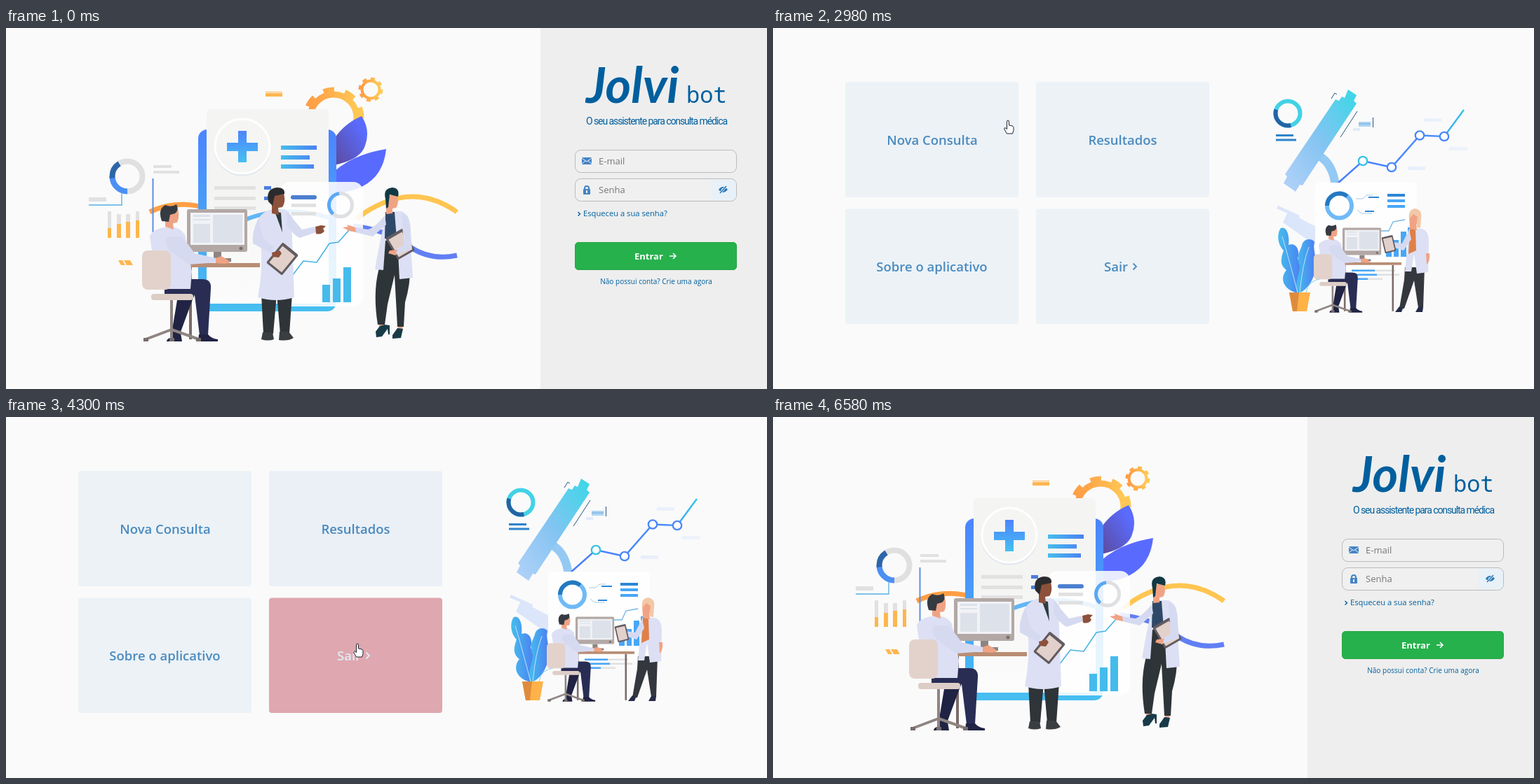
An HTML page for the animation above (7.71 s loop, 1085x516 px).

```html
<!DOCTYPE html>
<html lang="pt">
<head>
<meta charset="utf-8">
<style>
html,body{margin:0;width:100%;height:100%;overflow:hidden;background:#fafafa}
svg{display:block;width:1085px;height:516px;font-family:"Open Sans","Noto Sans",sans-serif}
.ln{fill:none}
.coat{fill:#dde0f4}
.sleeve{fill:#d6daf1}
.skin{fill:#f0a384}
.gray{fill:#e1e1e1}
.menu text{font-size:18.5px;font-weight:600;fill:#4b8bc0}
.card{fill:#ecf2f6}
.mark{fill:#005f9e}
</style>
</head>
<body>
<svg viewBox="0 0 1085 516">
<defs>
  <linearGradient id="tablet" x2="0" y2="1"><stop stop-color="#4c84ff"/><stop offset="1" stop-color="#46bff0"/></linearGradient>
  <linearGradient id="sky"><stop stop-color="#46bdec"/><stop offset="1" stop-color="#4b80f2"/></linearGradient>
  <linearGradient id="sun"><stop stop-color="#ff9c45"/><stop offset="1" stop-color="#ffc955"/></linearGradient>
  <linearGradient id="leaf" y1="1" y2="0"><stop stop-color="#5c4a9c"/><stop offset=".8" stop-color="#5a6cff"/></linearGradient>
  <linearGradient id="scope" x1="1" x2="0" y2="1"><stop stop-color="#38d8e6"/><stop offset=".5" stop-color="#84c4f2"/><stop offset="1" stop-color="#b4d2f8"/></linearGradient>
  <linearGradient id="trend" gradientUnits="userSpaceOnUse" x1="804" x2="985"><stop stop-color="#4a7dfa"/><stop offset=".75" stop-color="#4a8cff"/><stop offset="1" stop-color="#35c8e8"/></linearGradient>
  <linearGradient id="pale"><stop stop-color="#d9e4fa"/><stop offset="1" stop-color="#eef3fc"/></linearGradient>
  <linearGradient id="paper" x2="0" y2="1"><stop offset=".4" stop-color="#f4f4f3"/><stop offset="1" stop-color="#fcfcfc"/></linearGradient>

  <g id="worker">
    <path fill="#7a6b69" d="M261 342h4v103h-4zM368 342h4v103h-4z"/>
    <path fill="#b98d74" d="M251 336h138v6H251z"/>
    <path fill="#8d8583" d="M296 320h11v9h14v5h-41v-3l16-3z"/>
    <rect x="258" y="259" width="86" height="61" rx="3" fill="#b3a8a5"/>
    <path fill="#f1f3f7" d="M263 264h77v46h-77z"/>
    <path fill="#dde2ea" d="M267 267h24v3h-24zM267 273h24v2h-24zM267 280h24v27h-24zM295 267h42v40h-42z"/>
    <circle cx="335" cy="315" r="2.5" fill="#7a706e"/>
    <path fill="#202343" d="M246 366h24q2 10-4 22l-18 49h-12l8-48z"/>
    <path fill="#292d54" d="M226 359h54q13 0 12 13l-4 67h-12l-7-57-43 1z"/>
    <path fill="#202343" d="M236 436h13l2 12h-22q0-4 7-6zM275 438h13q5 6 14 7v3h-28z"/>
    <path class="coat" d="M226 285q-18 3-21 13l4 27 17 48h37l2-25-10-53q-11-14-29-10z"/>
    <path class="sleeve" d="M232 298q-10 5 2 21l27 19 41-3-2-6-31-7-18-24z"/>
    <path class="skin" d="M227 284v-11l18-15q3 12-1 20l-6 1 1 9zM299 329l8-3q8 4 13 9l-8 2-13-1z"/>
    <path fill="#363b42" d="M222 276q-6-17 5-23 9 4 16-1 4 8-2 13l-7 2-2 10z"/>
    <rect x="194" y="318" width="41" height="56" rx="8" fill="#e3d2cb"/>
    <rect x="207" y="380" width="60" height="9" rx="4" fill="#dccdc6"/>
    <path class="ln" stroke="#8f8582" stroke-width="4" d="M236 389v43M236 431l-37 14M236 431l39 14M236 431v15"/>
    <path fill="#766d6c" d="M196 443h7v5h-7zM233 443h7v5h-7zM271 443h7v5h-7z"/>
  </g>
  <g id="board"><rect x="-14" y="-18" width="28" height="36" rx="2" fill="#635b60"/><path fill="#e2d1cb" d="M-11-14h22v29h-22z"/></g>
</defs>

<g id="login">
  <path fill="#eee" d="M762 0h323v516H762z"/>
  <!-- gears and tablet -->
  <g class="ln" stroke="url(#sun)">
    <circle cx="467" cy="128" r="33" stroke-width="9"/><circle cx="467" cy="128" r="39" stroke-width="9" pathLength="16" stroke-dasharray="1" stroke-dashoffset="-1.06"/>
    <circle cx="520" cy="88" r="12.5" stroke-width="4"/><circle cx="520" cy="88" r="15.5" stroke-width="4" pathLength="16" stroke-dasharray="1"/>
    <path stroke="#ff9f45" stroke-width="7" d="M205 263q36-18 80-6"/>
  </g>
  <path fill="#ffb650" d="M370 91h24v1h-24zM370 93h24v5h-24zM160 332h6l4 7h-6zM168 332h9l4 7h-9z"/>
  <path fill="url(#leaf)" d="M468 196V158q15-22 39-32 13 20 5 42-6 20-44 28z"/>
  <path fill="#596bff" d="M468 236v-31q26-24 74-32-6 59-74 63z"/>
  <rect x="274" y="145" width="197" height="260" rx="13" fill="url(#tablet)"/>
  <rect x="286" y="116" width="174" height="278" rx="5" fill="url(#paper)"/>
  <circle cx="337" cy="171" r="39" class="ln" stroke="#e0e7ee" stroke-width="3"/>
  <circle cx="337" cy="169" r="39" fill="#f5f5f4" stroke="#fff" stroke-width="3"/>
  <path fill="url(#tablet)" d="M331 147h12v17h16v12h-16v16h-12v-16h-16v-12h16z"/>
  <path fill="url(#sky)" d="M392 168h51v6h-51zM392 182h41v6h-41zM392 195h47v6h-47z"/>
  <path class="gray" d="M297 226h59v5h-59zM297 241h59v5h-59zM297 255h59v5h-59z"/>
  <path fill="#4b7edc" d="M368 226h10v5h-10zM368 241h10v5h-10z"/>
  <path class="ln" stroke="#62b6f5" stroke-width="6" d="M318 285q68-38 145-13"/>
  <path class="ln" stroke="#ffc552" stroke-width="7" d="M500 273q16-14 38-23 54-23 105 13"/>
  <path class="ln" stroke="#617ff4" stroke-width="7" d="M495 283q50 6 81 30 30 20 67 12"/>
  <rect x="391" y="220" width="118" height="178" rx="14" fill="#fff" opacity=".87"/>
  <rect x="406" y="239" width="37" height="6" rx="3" fill="#4c7fd0"/>
  <path class="gray" d="M407 251h35v5h-35zM407 263h35v5h-35z"/>
  <g class="ln" stroke-width="5">
    <circle cx="477" cy="253" r="16.5" stroke="#dfe0e2"/>
    <circle cx="477" cy="253" r="16.5" stroke="#5aa8f4" pathLength="100" stroke-dasharray="37 63" stroke-dashoffset="-36"/>
  </g>
  <path class="ln" stroke="#48b2e4" stroke-width="1.6" d="M405 358l19-25 19 2 18-27 13-2 15-17"/>
  <path fill="#45bbec" d="M451 367h11v25h-11zM466 358h11v34h-11zM481 342h11v50h-11z"/>
  <!-- left charts -->
  <g class="ln" stroke-width="8">
    <circle cx="173" cy="212" r="21.5" stroke="#e0e0e0"/>
    <circle cx="173" cy="212" r="21.5" stroke="#4c8ff4" pathLength="100" stroke-dasharray="24 76" stroke-dashoffset="-25"/>
    <circle cx="173" cy="212" r="21.5" stroke="#2c66a8" pathLength="100" stroke-dasharray="18 82" stroke-dashoffset="-48"/>
  </g>
  <path class="gray" d="M210 196h26v4h-26zM210 204h37v4h-37zM118 242h25v6h-25zM145 262h5v24h-5zM158 266h6v15h-6zM171 266h6v12h-6zM185 262h5v13h-5z"/>
  <path fill="#ffb64c" d="M145 286h5v14h-5zM158 280h6v20h-6zM171 277h6v23h-6zM185 275h5v25h-5z"/>
  <path class="ln" stroke="#54b0e2" stroke-width="1.3" d="M118 253h47v-18"/>
  <path class="ln" stroke="#5b8ee6" stroke-width="2" d="M209.5 215v77"/>
  <svg width="362" height="516"><use href="#worker"/></svg>
  <!-- standing man -->
  <path fill="#2e3437" d="M364 380h22l-5 57h-14zM386 380h22l-4 57h-13z"/>
  <path fill="#3a3e41" d="M366 435h14l2 10q-9 3-18 0zM390 434h13l7 9q-8 5-21 3z"/>
  <path class="coat" d="M376 260l20-1q10 3 11 15l4 111q-26 8-52 0 8-42 4-82l-11-3q4-35 24-40z"/>
  <path fill="#2d3b3f" d="M383 262l9 2 2 28z"/>
  <path class="sleeve" d="M400 263q6 2 10 11l12 14 18-4 2 8-23 8q-8-3-19-18zM360 272q-10 20-8 36l26 14 4-9-15-12z"/>
  <path fill="#8c513b" d="M379 265v-24l16-8q5 14-1 23l-6 1 1 10zM441 284l8-2 7 1-4 4 2 3q-4 6-12 4z"/>
  <path fill="#2b2b2d" d="M374 248q-4-18 12-20 12 0 11 9l-14 3-3 14z"/>
  <use href="#board" transform="translate(394 330) rotate(39) scale(1.04)"/>
  <path fill="#8c513b" d="M379 321l11-3 3 4-4 6-9-1z"/>
  <!-- standing woman -->
  <path class="skin" d="M532 418h7l-1 12h-6zM559 420h7l-1 12-6-2z"/>
  <path fill="#2e3538" d="M541 298h24l11 42q1 25-7 52l-2 35h-9l-4-74-10 42-4 29h-10q-7-44 1-77z"/>
  <path fill="#183b48" d="M527 434l6-8 7-2 7 1v13h-2l-1-8-8 11-8 1zM551 439l7-10 8 1-3 13-12 1z"/>
  <path class="coat" d="M542 262h22q10 4 11 15l5 80-19 2-3-58-17 3-3 42-12-1q5-30 10-52z"/>
  <path fill="#304867" d="M541 263h13l3 38h-17z"/>
  <path class="sleeve" d="M540 268q-15 18-24 20l-18-3v7l25 6 19-17z"/>
  <path class="skin" d="M498 285l-12-4 2 3-8 1 9 5 10 2zM542 266v-25l14-5q6 13 0 21l-5 1v7z"/>
  <path fill="#123943" d="M541 244q-4-15 10-16 11 1 8 13l-12-3-2 18-3 2z"/>
  <use href="#board" transform="translate(562 309) rotate(-30)"/>
  <path class="sleeve" d="M564 266q13 0 13 26l2 24-24 8 0-7 12-7z"/>
  <path class="skin" d="M558 317l-11 1-2 4 10 3z"/>
  <!-- form -->
  <g class="mark">
    <text x="827" y="107" font-family="Lato,sans-serif" font-size="70" font-weight="700" font-style="italic">Jolvi</text>
    <text x="970" y="107" font-family="Noto Sans Mono,monospace" font-size="32" font-weight="500">bot</text>
    <text x="827" y="138" font-family="Roboto,sans-serif" font-size="14" letter-spacing="-1.08">O seu assistente para consulta médica</text>
    <text x="823" y="269" font-size="11.2">Esqueceu a sua senha?</text>
    <text id="signup" x="927" y="366" font-size="10.05" text-anchor="middle">Não possui conta? Crie uma agora</text>
  </g>
  <g fill="#f0f0f0" stroke="#b9bbbd"><rect x="811.5" y="174.5" width="230" height="32" rx="8"/><rect x="811.5" y="215.5" width="230" height="32" rx="8"/></g>
  <path fill="#e8f0f8" d="M1006 217h28q7 1 7 7v15q0 6-7 7h-28z"/>
  <rect x="821" y="185" width="14" height="10" rx="1" fill="#4484c4"/>
  <path class="ln" stroke="#eef2f6" d="M821 186l7 5 7-5M821 194l5-4M835 194l-5-4"/>
  <rect x="823" y="230" width="10" height="8" rx="1" fill="#4484c4"/>
  <path class="ln" stroke="#4484c4" stroke-width="2" d="M825 231v-2q0-3 3-3t3 3v2"/>
  <path fill="#eee" d="M827 232h2v4h-2z"/>
  <path fill="#2879b9" d="M1016 231q6-8 13 0-7 8-13 0z"/><circle cx="1022" cy="231" r="2" fill="#e8f0f8"/>
  <path class="ln" stroke="#e8f0f8" stroke-width="3" d="M1018 236l9-10"/><path class="ln" stroke="#2879b9" stroke-width="1.4" d="M1018 236l9-10"/>
  <g font-size="13" fill="#777"><text x="845" y="195">E-mail</text><text x="845" y="236">Senha</text></g>
  <path class="ln" stroke="#005f9e" stroke-width="1.4" d="M815.5 263l3 2.700-3 2.700"/>
  <rect id="enter" x="811.5" y="306.5" width="230" height="39" rx="4.5" stroke="#28a745"/>
  <text x="896" y="331" font-size="13" font-weight="700" fill="#fff">Entrar</text>
  <path class="ln" stroke="#fff" stroke-width="1.5" d="M946 326h9M951 322l4 4-4 4"/>
</g>

<g id="home" class="menu">
  <rect class="card" x="103" y="77" width="247" height="165" rx="4"/><text x="227" y="167" text-anchor="middle">Nova Consulta</text>
  <rect class="card" x="375" y="77" width="247" height="165" rx="4"/><text x="498.5" y="167" text-anchor="middle">Resultados</text>
  <rect class="card" x="375" y="258.5" width="247" height="164.5" rx="4"/><text x="472" y="348">Sair</text>
  <rect class="card" x="103" y="258.5" width="247" height="164.5" rx="4"/><text x="226.5" y="348" text-anchor="middle">Sobre o aplicativo</text>
  <path id="chevron" class="ln" stroke-width="1.8" d="M513.5 336.5l4.500 4.500-4.500 4.500"/>
  <!-- microscope and trend -->
  <g class="ln" stroke-width="6">
    <circle cx="734" cy="122" r="17.5" stroke="#42d2e6"/>
    <circle cx="734" cy="122" r="17.5" stroke="#2464a4" pathLength="100" stroke-dasharray="34 66" stroke-dashoffset="-21"/>
  </g>
  <path fill="#2d83cc" d="M717 152h25v3h-25zM717 158.500h29v3h-29z"/>
  <path class="ln" stroke="#94c9f4" stroke-width="12" d="M779 183q20 12 23 44"/>
  <path fill="url(#scope)" d="M820 88l12 8-4 8 4 4-77 117-4-1-6 10-17-12 5-10-3-3 72-107 5 2 4-6 4 2z"/>
  <path class="ln" stroke="#28527e" d="M796 101l5-8 3 2M809 156l24-37M855.500 128v14"/>
  <path fill="#aed5f3" d="M835 134h17v7h-17z"/><path class="ln" stroke="#6ca9da" d="M835 137h17"/>
  <path fill="url(#pale)" d="M928 129h25v5h-25zM964 170h26v5h-26zM905 198h25v5h-25zM827 143h10v4h-10zM720 254l31 14-1 4-32-14zM734 263l40 21v27l-47-33z"/>
  <path class="ln" stroke="url(#trend)" stroke-width="2.500" d="M804 223l37-33 41 9 40-45.500 35 1.500 28-38"/>
  <g fill="#fff" stroke="#4a86fa" stroke-width="2.300"><circle cx="841" cy="190" r="6.200" stroke="#38c0e4"/><circle cx="882" cy="199" r="6.200"/><circle cx="922" cy="153.500" r="6.200"/><circle cx="957" cy="155" r="6.200"/></g>
  <rect x="773" y="221" width="145" height="129" rx="6" fill="#fefefe"/>
  <g class="ln" stroke-width="6">
    <circle cx="807.5" cy="254" r="17.5" stroke="#70baf6"/>
    <circle cx="807.5" cy="254" r="17.5" stroke="#2379c2" pathLength="100" stroke-dasharray="36 64" stroke-dashoffset="-50"/>
  </g>
  <path class="ln" stroke="#a6c9e4" d="M831 244h10l5-5h9M833 260l6 5h15"/>
  <path fill="#2d86d6" d="M849 241h15v2h-15zM844 261h13v2h-13zM876 237h25v4h-25z"/>
  <path fill="#48a6f8" d="M876 245h25v4h-25zM876 253h25v4h-25zM874 309h8v18h-8zM885 303h7v24h-7zM895 291h8v36h-8zM905 285h8v42h-8z"/>
  <path class="ln" stroke="#73b4e6" stroke-width="1.300" d="M866 290h12l6-13 17-3"/>
  <path class="gray" d="M825 345.500h62v2.500h-62zM825 351.500h68v2.500h-68zM825 357.500h44v2.500h-44z"/>
  <path fill="#48a6f8" d="M825 345.500h33v2.500h-33zM825 351.500h36v2.500h-36zM825 357.500h23v2.500h-23z"/>
  <!-- plant -->
  <g fill="url(#sky)">
    <path d="M745 378c-17-5-23-20-13-32-11-8-7-19-4-28-10-10-9-26-4-32 9-4 13 13 11 24 11-4 17 8 13 20 8 12 4 32 1 48z"/>
    <path d="M747 378c-3-16 4-26 4-38-6-14 1-22 3-29 2-11 15-11 18-5-3 12 4 19 0 32 4 12-7 34-20 40z"/>
  </g>
  <path class="ln" stroke="#bde4ff" d="M726 298q10 34 22 80M764 313q-9 24-13 65"/>
  <path class="ln" stroke="#7ecdf4" d="M760 378q2-17 23-20"/>
  <path fill="#ffb247" d="M736 378h30l-5 27h-20z"/><path fill="#df8b3e" d="M736 378h14l-3 27h-6z"/>
  <use href="#worker" transform="translate(646.6 119.5) scale(.641)"/>
  <!-- woman with clipboard -->
  <path fill="#34373d" d="M901 342h28l-2 58h-7l-6-39-14 40h-7l7-41z"/>
  <path fill="#252b47" d="M893 398l5 3-2 5h-9zM920 399h7l-1 7h-10z"/>
  <path class="coat" d="M907 287h18q9 2 10 16l-1 46-16 2-4-28-4 25h-9z"/>
  <path fill="#df8049" d="M908 287h8l1 31-11 5z"/>
  <path class="sleeve" d="M907 288l-10 20-13-2-1 7 16 5 11-16z"/>
  <path class="skin" d="M908 287l-1-19 10-5 5 14-5 4 1 8zM877 306l7 0-1 7-8-2zM931 322h5q1 12-4 16z"/>
  <path fill="#f3c8a8" d="M907 273q-2-14 9-15 10 2 8 14l-1 14-6-1 2-15-6-4z"/>
  <use href="#board" transform="translate(878 309) rotate(-13) scale(.58 .65)"/>
</g>

<circle id="click" r="10" fill="#e9c64e"/>
<g id="cursor" stroke="#20222e" fill="#fff" stroke-linejoin="round">
  <path id="arrow" d="M.5.500V14l3.200-3 2.200 4.800 2-.9-2.200-4.700H10z"/>
  <path id="hand" d="M-1.500 2q0-2 1.500-2t1.500 2v5l2.500.4 3 1q1 .6 1 2.600v3.500L6.500 19h-8L-5 13q-1-2.300 1-2.400l2.500 2z"/>
</g>
</svg>
<script>
const LOOP = 7710;
const $ = id => document.getElementById(id);
const cards = document.querySelectorAll('.card'), labels = document.querySelectorAll('.menu text');

// start, end, number of steps, [step, x, y] waypoints
const moves = [
  [110, 810, 11, [[1,577,456],[6,690,275],[9,783,193],[11,802,208]]],
  [940, 1490, 9, [[1,806,210],[5,880,262],[9,952,325]]],
  [2440, 3120, 11, [[0,952,325],[3,800,265],[7,440,150],[9,335,132],[10,315,128],[11,300,140]]],
  [3320, 4090, 12, [[0,300,140],[4,350,170],[8,430,205],[12,478,257]]],
  [4160, 4440, 5, [[1,486,306],[5,515,341]]],
  [5390, 6160, 12, [[0,515,341],[6,780,352],[8,870,362],[10,935,395],[12,965,430]]],
  [6230, 6580, 6, [[0,965,430],[5,1036,505],[6,1046,540]]]
];

function pointer(t) {
  const move = moves.filter(m => t >= m[0]).pop();
  if (!move) return [-50, -50];
  const [start, end, n, pts] = move;
  const step = Math.min(n, 1 + Math.floor((t - start) / (end - start) * (n - 1) + .1));
  const i = Math.max(1, pts.findIndex(p => p[0] >= step));
  const [a, b] = [pts[i - 1], pts[i]], u = (step - a[0]) / (b[0] - a[0]);
  return [a[1] + (b[1] - a[1]) * u, a[2] + (b[2] - a[2]) * u];
}

const show = (id, on) => $(id).style.display = on ? '' : 'none';
const mix = (from, to, u) => `color-mix(in srgb, ${to} ${u * 100}%, ${from})`;
// stepped hover fade
function rise(t, start) {
  const k = Math.floor((t - start) / 70) + 1;
  return k < 1 ? 0 : Math.min(1, .2 + .21 * k);
}
function paintCard(i, u, fill, ink) {
  cards[i].style.fill = mix('#ecf2f6', fill, u);
  labels[i].style.fill = mix('#4b8bc0', ink, u);
}

function draw(now) {
  const t = now % LOOP, login = t < 1960 || t >= 4910;
  const [x, y] = pointer(t);
  const over = (l, top, r, b) => x >= l && x <= r && y >= top && y <= b;
  const onEnter = login && over(811, 306, 1042, 346);
  const onLink = login && over(847, 357, 1007, 369);
  const onCard = !login && (over(103, 77, 350, 242) || over(375, 77, 622, 242) || over(375, 259, 622, 423));
  const hand = onEnter || onLink || onCard || (t >= 4910 && t < 5060);

  show('login', login);
  show('home', !login);
  show('hand', hand);
  show('arrow', !hand);
  show('click', (t >= 1890 && t < 1960) || (t >= 4770 && t < 4910));
  $('cursor').setAttribute('transform', `translate(${Math.round(x)} ${Math.round(y)})`);
  $('click').setAttribute('transform', `translate(${x - 1} ${y})`);
  $('enter').style.fill = onEnter ? '#219b42' : '#26b14c';
  $('signup').style.textDecoration = onLink ? 'underline' : 'none';

  paintCard(0, rise(t, 3050) - rise(t, 3600), '#dfe6f3', '#3474b4');
  paintCard(1, rise(t, 3670) - rise(t, 4160), '#dfe6f3', '#3f80ba');
  paintCard(2, rise(t, 4160), '#dc98a0', '#ffffff');
  $('chevron').style.stroke = labels[2].style.fill;
}

const began = performance.now();
function tick() {
  draw(performance.now() - began);
  requestAnimationFrame(tick);
}
tick();
</script>
</body>
</html>
```
